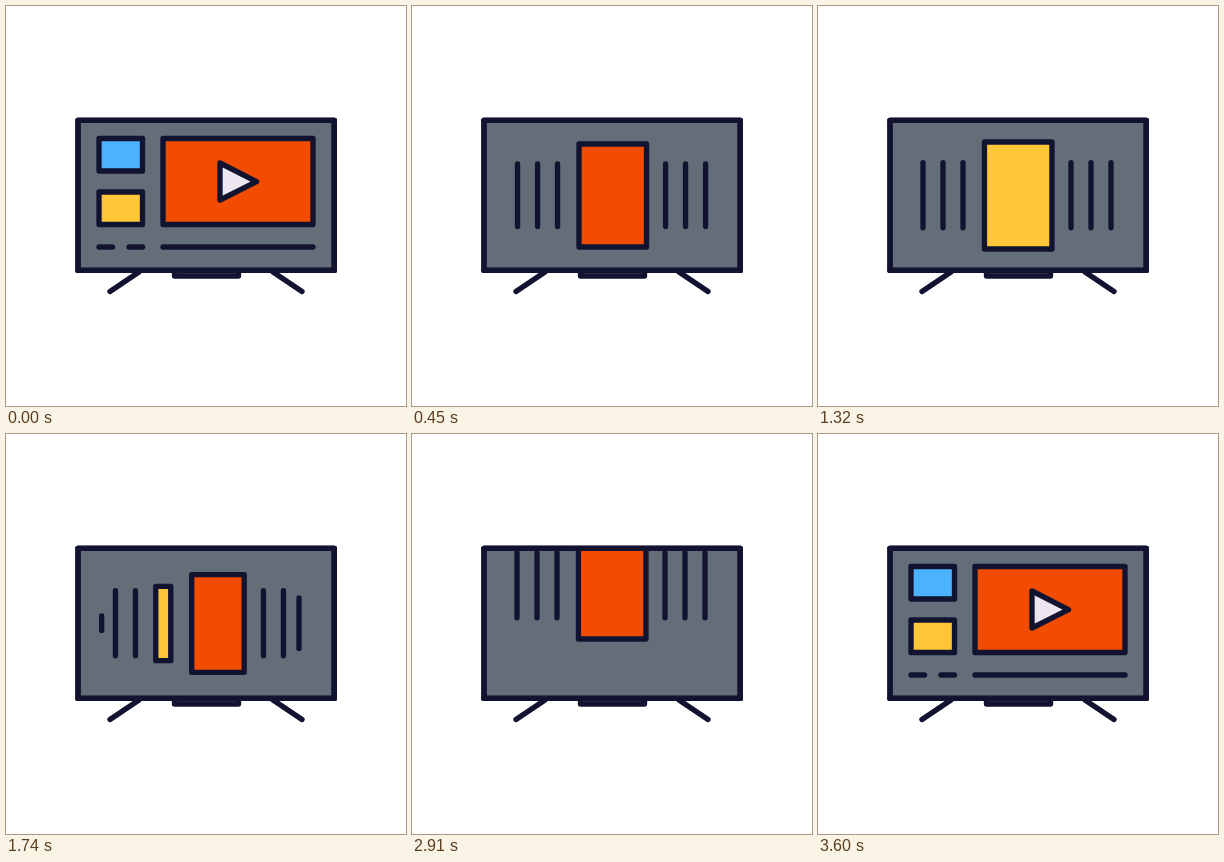
Write an HTML page with a canvas that moves like this. It is 400 by 400 pixels and loops after 5630 ms.

```html
<!DOCTYPE html>
<html lang="en">
<head>
<meta charset="utf-8">
<title>Smart TV</title>
<style>
  html, body { margin: 0; height: 100%; overflow: hidden; background: #fff; }
  canvas { display: block; width: 100vw; height: 100vh; }
</style>
</head>
<body>
<canvas width="400" height="400"></canvas>
<script>
const ctx = document.querySelector('canvas').getContext('2d');
const LOOP = 5630;
const INK = '#121331', GREY = '#646e78', PALE = '#ebe6ef';
const RED = '#f24c00', BLUE = '#4bb3fd', YELLOW = '#ffc738';
const CARDS = [RED, BLUE, YELLOW, RED];
const SLOTS = [93, 105, 125, 145, 200.2, 253, 273, 293, 293];

const mix = (a, b, p) => a + (b - a) * p;
const span = (t, from, to) => Math.min(1, Math.max(0, (t - from) / (to - from)));
const quad = p => p < .5 ? 2 * p * p : 1 - 2 * (1 - p) ** 2;
const cubic = p => p < .5 ? 4 * p ** 3 : 1 - 4 * (1 - p) ** 3;
const easeOut = p => 1 - (1 - p) ** 3;

function shape(points, fill) {
  ctx.beginPath();
  points.forEach(([x, y]) => ctx.lineTo(x, y));
  if (fill) {
    ctx.closePath();
    ctx.fillStyle = fill;
    ctx.fill();
  }
  ctx.stroke();
}

const line = (x1, y1, x2, y2) => shape([[x1, y1], [x2, y2]]);
const box = (l, t, r, b, fill) => shape([[l, t], [r, t], [r, b], [l, b]], fill);

function scaled(cx, cy, scale, draw) {
  ctx.save();
  ctx.translate(cx, cy);
  ctx.scale(scale, scale);
  ctx.translate(-cx, -cy);
  draw();
  ctx.restore();
}

function drawHome(scale) {
  scaled(114.7, 148.7, scale, () => box(93, 132.5, 136.5, 165, BLUE));
  scaled(114.7, 202.2, scale, () => box(93, 186, 136.5, 218.5, YELLOW));
  scaled(232, 175.5, scale, () => {
    box(157, 132.5, 307, 218.5, RED);
    shape([[214, 157], [250.5, 175.7], [214, 194]], PALE);
  });
  scaled(99.7, 241, scale, () => line(93, 241, 106.5, 241));
  scaled(129.7, 241, scale, () => line(123, 241, 136.5, 241));
  scaled(232, 241, scale, () => line(157, 241, 307, 241));
}

// Cards away from the centre are seen edge-on, as plain lines.
function drawCarousel(pos, stretch, press) {
  for (let i = -3; i <= 6; i++) {
    const slot = i - pos, away = Math.abs(slot);
    if (away >= 4) continue;
    const k = Math.floor(slot), x = mix(SLOTS[k + 4], SLOTS[k + 5], slot - k);
    const front = Math.max(0, 1 - away);
    const zoom = mix(1, press, front);
    const w = 67.5 * front * zoom / 2;
    const h = mix(65, 107, front) * Math.min(1, 4 - away) * stretch * zoom / 2;
    if (front) box(x - w, 189.5 - h, x + w, 189.5 + h, CARDS[i]);
    else line(x, 189.2 - h, x, 189.2 + h);
  }
}

function drawScreen(t) {
  const slide = 256 * cubic(span(t, 0, 490));
  if (t < 490) {
    ctx.save();
    ctx.translate(-slide, 0);
    drawHome(1);
    ctx.restore();
  }
  if (t > 0 && t < 3201) {
    const pos = [540, 1050, 1560].reduce((sum, s) => sum + quad(span(t, s, s + 270)), 0);
    const stretch = mix(.9, 1, quad(span(t, 330, 540)));
    const press = 1 - .15 * Math.sin(Math.PI * span(t, 2280, 2640));
    ctx.save();
    ctx.translate(256 - slide, -130 * quad(span(t, 2730, 3201)));
    drawCarousel(pos, stretch, press);
    ctx.restore();
  }
  if (t > 3140) drawHome(easeOut(span(t, 3140, 3600)));
}

function draw(t) {
  ctx.fillStyle = '#fff';
  ctx.fillRect(0, 0, 400, 400);
  ctx.lineWidth = 5.35;
  ctx.lineCap = ctx.lineJoin = 'round';
  ctx.strokeStyle = INK;
  line(133, 266, 104, 285.5);
  line(267, 266, 296, 285.5);
  box(168.5, 264.5, 232.5, 270.1, GREY);
  box(72, 114.3, 328.3, 264.4, GREY);

  ctx.save();
  ctx.beginPath();
  ctx.rect(72, 114.3, 256.3, 150.1);
  ctx.clip();
  drawScreen(t);
  ctx.restore();
  box(72, 114.3, 328.3, 264.4);
  shape([[72, 114.3], [328.3, 114.3], [328.3, 264.4], [72, 264.4], [72, 114.3]]);
}

let start;
function tick(now) {
  start ??= now;
  draw((now - start) % LOOP);
  requestAnimationFrame(tick);
}
requestAnimationFrame(tick);
</script>
</body>
</html>
```
